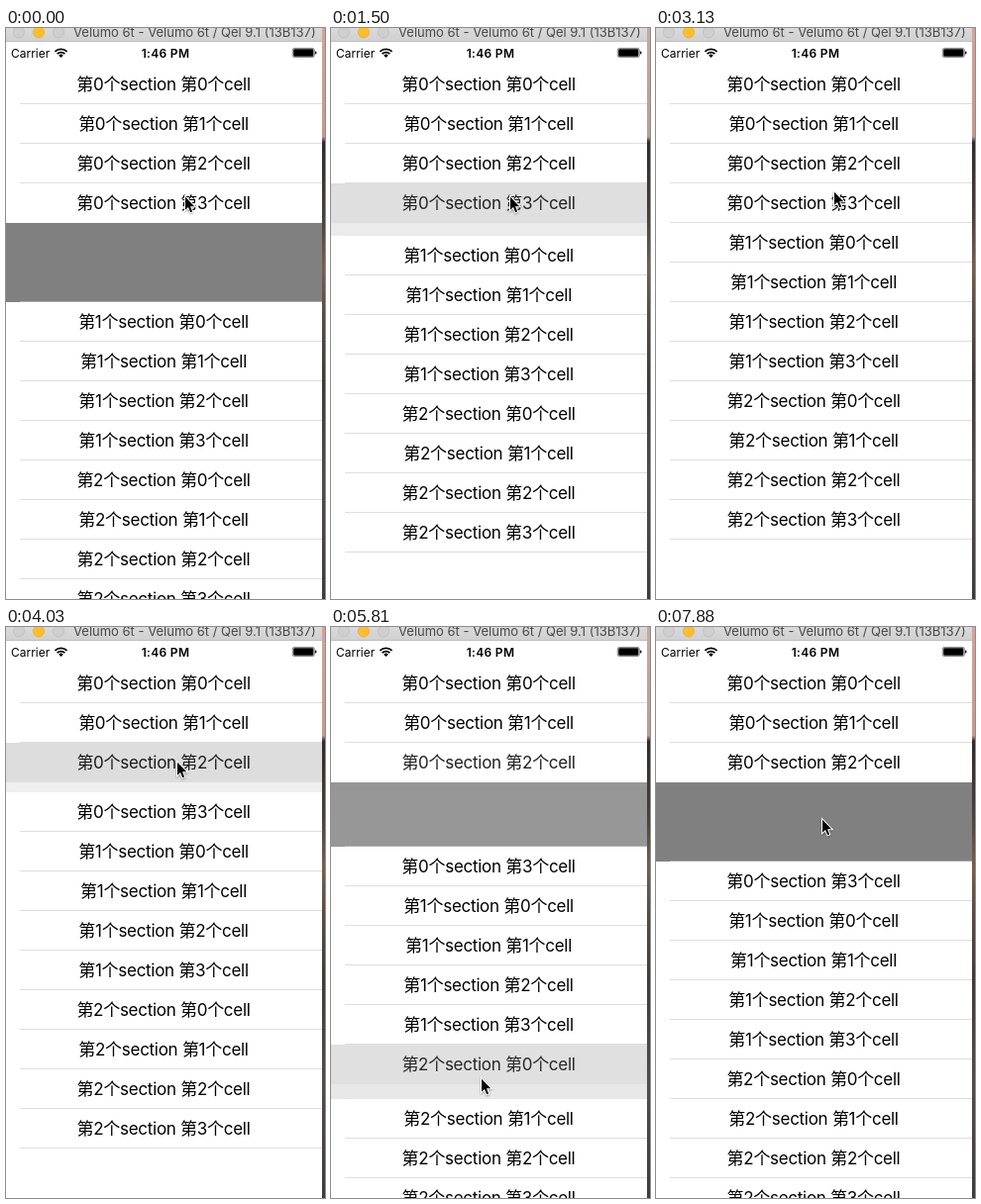
An HTML page with a canvas for the animation above (8000 ms loop, 322 by 577 pixels).

```html
<!DOCTYPE html>
<html lang="zh-Hans">
<head>
<meta charset="utf-8">
<title>Expanding table cells</title>
<style>
  html, body { margin: 0; width: 100%; height: 100%; overflow: hidden; background: #fff; }
  canvas { display: block; width: 322px; height: 577px; }
</style>
</head>
<body>
<canvas id="stage"></canvas>
<script>
const WIDTH = 322, HEIGHT = 577, SCREEN = 319;
const LOOP = 8000, STEP = 148.5, FADE = 300;
const TOP = 37, ROW = 40, GAP = 80, ROWS = 12;
const SANS = 'Inter, "Noto Sans CJK SC", "Noto Sans CJK", sans-serif';

// Taps: start time, row that closes, row that opens
const taps = [
  { at: -FADE, closes: null, opens: 3 },
  { at: 130, closes: 3, opens: null },
  { at: 1410, closes: null, opens: 3 },
  { at: 2655, closes: 3, opens: null },
  { at: 3943.5, closes: null, opens: 2 },
  { at: 5709, closes: 2, opens: 8 },
  { at: 7350, closes: 8, opens: 2 }
];

// Pointer moves: start, end, destination
const pointerStart = [180, 169];
const pointerMoves = [
  [2940, 3720, 172, 135],
  [4280, 5080, 151, 455],
  [6060, 7270, 174, 138],
  [7600, 7860, 167, 193]
];

const canvas = document.getElementById('stage');
const ctx = canvas.getContext('2d');
const ratio = window.devicePixelRatio || 1;
canvas.width = WIDTH * ratio;
canvas.height = HEIGHT * ratio;

const ease = u => {
  u = Math.min(1, Math.max(0, u));
  return u * u * (3 - 2 * u);
};

function rect(color, x, y, w, h) {
  ctx.fillStyle = color;
  ctx.fillRect(x, y, w, h);
}

function label(text, x, y, font, { color = '#000', align = 'left', spacing = 0 } = {}) {
  ctx.font = `${font} ${SANS}`;
  ctx.letterSpacing = `${spacing}px`;
  ctx.textAlign = align;
  ctx.fillStyle = color;
  ctx.fillText(text, x, y);
}

function verticalGradient(y0, y1, stops) {
  const gradient = ctx.createLinearGradient(0, y0, 0, y1);
  stops.forEach(([offset, color]) => gradient.addColorStop(offset, color));
  return gradient;
}

function drawTitleBar() {
  rect(verticalGradient(0, 13, [[0, '#dadada'], [1, '#d0d0d0']]), 0, 0, SCREEN, 13);
  rect('#c0c0c0', 0, 13, SCREEN, 1);
  [['#cfcfcf', '#bbbbbb'], ['#fdbd2f', '#ecab2c'], ['#cfcfcf', '#bbbbbb']].forEach(([fill, edge], i) => {
    ctx.beginPath();
    ctx.arc(13 + 20 * i, 4.3, 5.6, 0, 7);
    ctx.fillStyle = fill;
    ctx.fill();
    ctx.strokeStyle = edge;
    ctx.lineWidth = 0.8;
    ctx.stroke();
  });
  label('Velumo 6t - Velumo 6t / Qel 9.1 (13B137)', 68, 9, '13px', { color: '#484848' });
}

function drawStatusBar() {
  label('Carrier', 5, 30, '12px');
  label('1:46 PM', 161, 30, '600 12px', { align: 'center', spacing: 0.3 });

  ctx.strokeStyle = '#000';
  ctx.lineWidth = 1.8;
  [8.6, 5.4].forEach(radius => {
    ctx.beginPath();
    ctx.arc(55.5, 30, radius, -Math.PI * 0.75, -Math.PI * 0.25);
    ctx.stroke();
  });
  ctx.beginPath();
  ctx.moveTo(55.5, 30);
  ctx.arc(55.5, 30, 3.2, -Math.PI * 0.75, -Math.PI * 0.25);
  ctx.fillStyle = '#000';
  ctx.fill();

  ctx.lineWidth = 0.5;
  ctx.beginPath();
  ctx.roundRect(289.3, 20.4, 22, 9.2, 2);
  ctx.stroke();
  ctx.beginPath();
  ctx.roundRect(290.2, 21.2, 20.2, 7.6, 1.2);
  ctx.roundRect(312, 23.5, 1.4, 3, 0.7);
  ctx.fill();
}

function drawDesktopEdge() {
  const picture = verticalGradient(0, HEIGHT, [
    [0, '#d0a59c'], [0.19, '#c49a90'], [0.2, '#2e2b2b'], [0.33, '#4a403b'],
    [0.42, '#75604f'], [0.5, '#5a4c42'], [0.62, '#3f3b39'], [0.8, '#514d4b'], [1, '#3d3b3b']
  ]);
  rect(picture, SCREEN, 0, WIDTH - SCREEN, HEIGHT);
}

function drawCell(index, top, height, { open, tapped, alpha = 1 }) {
  ctx.globalAlpha = alpha;
  if (tapped) {
    rect('#d9d9d9', 0, top, SCREEN, open ? height : ROW);
  } else {
    if (open) rect('#808080', 0, top + ROW, SCREEN, height - ROW);
    rect('rgba(200, 199, 204, 0.6)', 14, top + height - 1, SCREEN - 14, 1);
  }
  const text = `第${Math.floor(index / 4)}个section 第${index % 4}个cell`;
  label(text, 159, top + 26, '17px', { align: 'center', spacing: -0.28 });
  ctx.globalAlpha = 1;
}

function drawTable(time) {
  const { at, closes, opens } = taps.findLast(tap => tap.at <= time);
  const progress = ease((time - at) / FADE);
  const tappedRow = opens ?? closes;
  const grown = Math.round(GAP * progress);
  let top = TOP;
  for (let i = 0; i < ROWS; i++) {
    const height = ROW + (i === opens ? grown : i === closes ? GAP - grown : 0);
    if (progress < 1 && (i === opens || i === closes)) {
      drawCell(i, top, height, { open: i === opens, alpha: progress });
      drawCell(i, top, height, { open: i === closes, tapped: i === tappedRow, alpha: 1 - progress });
    } else {
      drawCell(i, top, height, { open: i === opens });
    }
    top += height;
  }
}

const arrow = new Path2D('M1 1.8V14.8L4 12L6.2 17.2L8.1 16.4L6 11.2H10.2Z');

function drawPointer(time) {
  let [x, y] = pointerStart;
  for (const [start, end, toX, toY] of pointerMoves) {
    const progress = ease((time - start) / (end - start));
    x += (toX - x) * progress;
    y += (toY - y) * progress;
  }
  ctx.save();
  ctx.translate(Math.round(x), Math.round(y));
  ctx.shadowColor = 'rgba(0, 0, 0, 0.35)';
  ctx.shadowBlur = 2 * ratio;
  ctx.shadowOffsetY = ratio;
  ctx.strokeStyle = '#fff';
  ctx.lineWidth = 2;
  ctx.stroke(arrow);
  ctx.shadowColor = 'transparent';
  ctx.fillStyle = '#000';
  ctx.fill(arrow);
  ctx.restore();
}

function render(now) {
  const time = Math.floor((now % LOOP) / STEP) * STEP;
  ctx.setTransform(ratio, 0, 0, ratio, 0, 0);
  rect('#fff', 0, 0, WIDTH, HEIGHT);
  drawTable(time);
  drawTitleBar();
  drawStatusBar();
  drawDesktopEdge();
  drawPointer(time);
}

let startTime;
function tick(now) {
  startTime ??= now;
  render(now - startTime);
  requestAnimationFrame(tick);
}
render(0);
requestAnimationFrame(tick);
</script>
</body>
</html>
```
